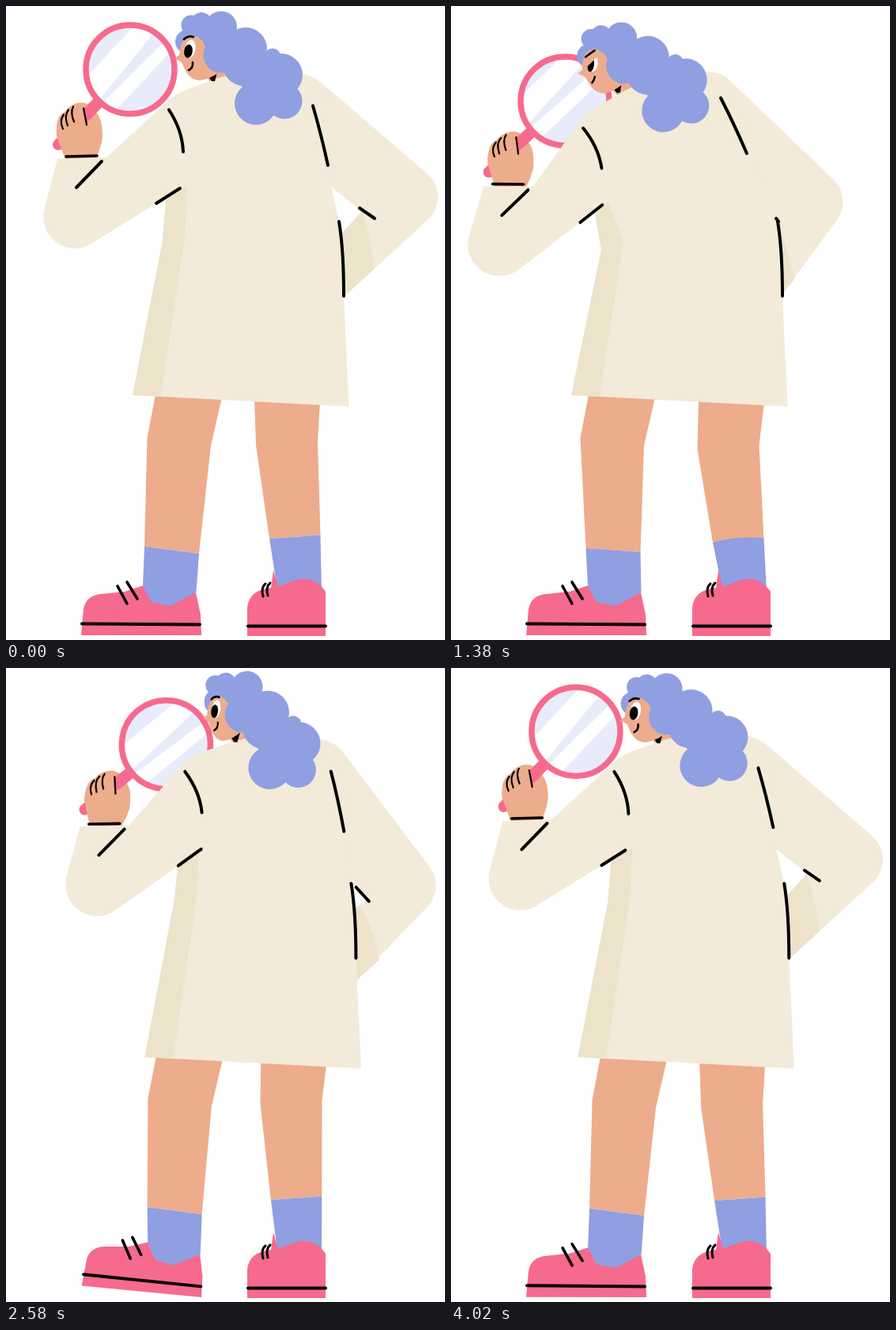
Recreate the animation shown at these times as an HTML page with a canvas. Size 555x800 px, loop 4.05 s.

```html
<!DOCTYPE html>
<html lang="en">
<head>
<meta charset="utf-8">
<title>Looking closer</title>
<style>
  html, body { margin: 0; width: 100%; height: 100%; overflow: hidden; background: #fff; }
  canvas { display: block; width: 555px; height: 800px; }
</style>
</head>
<body>
<canvas id="stage" width="555" height="800"></canvas>
<script>
const ctx = document.getElementById('stage').getContext('2d');
const LOOP = 4050, STEP = 30;
const COAT = '#f3ead9', SHADE = '#ede3cb', SKIN = '#edac8c', HAIR = '#909fe1';
const PINK = '#f66a8d', GLASS = '#e8ecfa', INK = '#000';

// --- Timing: three drivers from 0 to 1 move everything.
const span = (t, a, b) => Math.min(1, Math.max(0, (t - a) / (b - a)));
const glide = u => u + u * u - u * u * u;
const sway = u => (1 - Math.cos(Math.PI * u)) / 2;
function drivers(t) {
  const swing = sway(span(t, 1380, 2160));
  return {
    lean: glide(span(t, 0, 1260)) * (1 - swing),
    back: swing * glide(1 - span(t, 2160, LOOP)),
    lift: sway(span(t, 2520, 2940)) * (1 - sway(span(t, 3540, LOOP)))
  };
}

// --- Pose: home positions plus the reach of each driver.
function poseAt(t) {
  const { lean, back, lift } = drivers(t);
  const mix = (l, b, r) => l * lean + b * back + r * lift;
  const at = (x, y, l, b, r) => [x + mix(l[0], b[0], r[0]), y + mix(l[1], b[1], r[1])];
  const rig = (x, y, l, b, r, turn) => ({ home: [x, y], at: at(x, y, l, b, r), turn });
  const hemX = 160 + mix(-8, 17, -2);
  return {
    lean, back, lift,
    hem: (dx, y) => [hemX + dx, y],
    head:    rig(271, 24, [-57, 14], [36, -3], [3, 0], mix(-5.5, 9.5, 2)),
    chest:   rig(388, 126, [-47, -10], [25, 5], [0, 0], mix(-11, 2, 1)),
    arm:     rig(206, 131, [-39, 23], [22, 0], [4, -6], mix(-6, -4.5, 8.5)),
    forearm: rig(87, 266, [-26, 35], [31.5, 9], [-15.5, -23], mix(2, 0, 12)),
    lens:    rig(157, 80, [-13, 40], [49, 19], [13.5, -13], mix(3.3, 8.2, 5.2)),
    shoe:    rig(247, 794, [0, 0], [0, 0], [0, 0], 6 * back),
    joint:   at(507, 241, [-50.5, 6], [-3, 37], [3, -4]),
    gap:     at(450, 259, [-38, 11], [6, 36], [2, -4]),
    fold:    at(466, 331, [-32, 14], [6, 41], [2, -4]),
    crease:  at(447, 255, [-36, 13], [-5, 24], [3, -3])
  };
}

// --- Geometry helpers.
const rad = deg => deg * Math.PI / 180;
const shift = ([x, y], dx, dy) => [x + dx, y + dy];
const between = (a, b, f) => [a[0] + (b[0] - a[0]) * f, a[1] + (b[1] - a[1]) * f];
function carry({ home, at, turn }, x, y) {
  const dx = x - home[0], dy = y - home[1], c = Math.cos(rad(turn)), s = Math.sin(rad(turn));
  return [at[0] + dx * c - dy * s, at[1] + dx * s + dy * c];
}
function within({ home, at, turn }, draw) {
  ctx.save();
  ctx.translate(...at);
  ctx.rotate(rad(turn));
  ctx.translate(-home[0], -home[1]);
  draw();
  ctx.restore();
}

// --- Drawing helpers.
function fill(color, d) {
  ctx.fillStyle = color;
  ctx.fill(new Path2D(d));
}
function line(d, width = 4, color = INK) {
  ctx.strokeStyle = color;
  ctx.lineWidth = width;
  ctx.stroke(new Path2D(d));
}
const poly = (color, ...pts) => fill(color, 'M' + pts.join('L') + 'Z');
const join = (a, b, width) => line(`M${a}L${b}`, width);
const curve = (a, c, b) => line(`M${a}Q${c} ${b}`);
function oval(color, x, y, rx, ry = rx, tilt = 0) {
  ctx.fillStyle = color;
  ctx.beginPath();
  ctx.ellipse(x, y, rx, ry, rad(tilt), 0, 7);
  ctx.fill();
}
// Limb with a round joint; a and b are the ends of its outer edge.
function limb(a, c, r, b, side, ...rest) {
  const tangent = (q, s) => {
    const dx = q[0] - c[0], dy = q[1] - c[1];
    return Math.atan2(dy, dx) + s * Math.acos(r / Math.hypot(dx, dy));
  };
  ctx.fillStyle = COAT;
  ctx.beginPath();
  ctx.moveTo(...a);
  ctx.arc(...c, r, tangent(a, side), tangent(b, -side), side < 0);
  [b, ...rest].forEach(q => ctx.lineTo(...q));
  ctx.fill();
}

function drawLeg(hip, knee, ankle, thigh, calf, cuff) {
  poly(SKIN, hip, shift(hip, ...thigh), shift(knee, ...calf), shift(ankle, ...cuff), ankle, knee);
}

function drawLegs({ lean, back, shoe }) {
  const hipL = [189 - 15 * lean + back, 490];
  const ankleL = [175 - 4.5 * lean + 4 * back, 682 + 2 * lean - 2 * back];
  const cuffL = [69, 9 - 4 * lean];
  drawLeg(hipL, shift(hipL, -10.5, 55 - 2 * back), ankleL, [84, 4], [80.5, 9.5], cuffL);

  const ankleR = [333 - 2 * lean + 2 * back, 672 + 5 * lean - back];
  const cuffR = [64.5, -4.5 - lean];
  drawLeg([314 - lean + 9 * back, 496], [316 - 4.5 * lean + 6 * back, 554 + 5 * lean - 5 * back],
    ankleR, [83, 4], [78, -4], cuffR);

  within(shoe, () => {
    fill(PINK, 'M95 794L98 761Q101 744 120 742L150 739L174 731L210 745L240 740L246 768L247 794Z');
    line('M96 779.5L245 780.5');
    line('M141 732L153 754M153 727L166 748', 3.6);
  });
  poly(HAIR, ankleL, shift(ankleL, ...cuffL), carry(shoe, 240.5, 740),
    carry(shoe, 208, 757), carry(shoe, 184, 752.5), carry(shoe, 173, 732));

  fill(HAIR, `M${ankleR}Q${shift(ankleR, 32, -2 - 7 * lean)} ${shift(ankleR, ...cuffR)}`
    + 'L399 740L343 736Z');
  fill(PINK, 'M305 795V759Q307 737 335 734L338 712L344 733Q358 727 368 724Q390 719 404 739V795Z');
  line('M306 782.5H404');
  line('M325 745Q322 734 328 729M331 744Q328 733 334 728', 3);
}

function drawLens({ lens, lean }) {
  const thumb = 'M75 193L64 164C63 148 66 137 74 134C79 126 88 122 96 122';
  const heel = '122 163C121 175 118 181 114 192Z';
  within(lens, () => {
    fill(SKIN, `${thumb}C104 122 108 128 113 134C120 139 122 152 ${heel}`);
    line('M118 120L103 136', 15, PINK);
    line('M110 128L66 175', 14, PINK);
    fill(SKIN, `${thumb}L98 129L102 150L${heel}`);
    line('M72 155Q67 145 73 137M78 151Q73 138 79 131M86 146Q81 134 85 127M102 150L98 129', 2.2);

    ctx.save();
    ctx.beginPath();
    ctx.arc(157, 80, 55, 0, 7);
    ctx.clip();
    oval('#fff', 157, 80, 56);
    ctx.translate(157, 80);
    ctx.rotate(rad(-47));
    ctx.translate(0, -9 * lean);
    fill(GLASS, 'M-60 -60H60V-34H-60ZM-60 -2L60 -10V8L-60 3ZM-60 22H60V80H-60Z');
    ctx.restore();
    line('M101 80A56 56 0 1 1 213 80A56 56 0 1 1 101 80Z', 7.5, PINK);
  });
}

function drawCoat(p) {
  const { hem, lean, back, lift, gap, fold } = p;
  const chest = (x, y) => carry(p.chest, x, y + 3.5 * lean);
  const arm = (x, y) => carry(p.arm, x, y);
  const cuff = (x, y) => carry(p.forearm, x, y);
  const shoulder = arm(207, 118);
  const waist = 296 + 12 * lean - 8 * back;
  const pit = hem(42 - 12 * lean, 245 + 17 * lean - 10 * lift);
  const edge = hem(69 - 22 * lean, 226 + 20 * lean + 5 * back - 6 * lift);
  const side = hem(251 + 9 * (lean + back), 228 + 40 * lean + 45 * back - 6 * lift);
  const pocket = hem(264, 287 - 15 * lean + 20 * back);
  const wrist = hem(268, 366 - 4 * lean + 31 * back - 4 * lift);

  // Arm on the hip
  limb(chest(400, 98), p.joint, 39, wrist, 1, hem(240, 340), hem(220, 240));
  fill(SHADE, `M${between(gap, pocket, .6 * back)}Q${shift(between(gap, fold, .5), 3, 0)} `
    + `${fold}L${wrist}L${pocket}Z`);
  poly('#fff', side, gap, pocket, hem(261, 280));

  // Arm with the glass
  limb(p.forearm.at && cuff(65, 193), p.forearm.at, 39.8, arm(190, 249), -1,
    edge, shoulder, cuff(127, 191));

  fill(COAT, `M${hem(0, 491)}L${hem(38, waist)}L${pit}L${edge}L${shoulder}`
    + `Q${chest(217, 109)} ${chest(235, 103)}L${chest(268, 91)}L${chest(290, 85)}`
    + `L${chest(370, 85)}Q${chest(388, 87)} ${chest(400, 98)}`
    + `L${side}L${hem(261, 272)}L${hem(267, 366)}L${hem(273.5, 505.5)}Z`);
  poly(SHADE, hem(0, 491), hem(38, waist), pit, edge, hem(66, waist / 2 + 143), hem(36, 493));

  join(cuff(76, 190), cuff(115, 189), 3.6);
  join(cuff(121, 196), cuff(89, 229));
  curve(arm(206, 131), arm(223, 157), arm(224, 184));
  join(arm(190, 249), arm(220, 230));
  curve(...[[388, 126], [398, 160], [407, 201]].map(q => carry(p.chest, ...q)));
  join(p.crease, shift(p.crease, 19 - 16 * lean - 3 * back, 13 - 9 * lean + 5 * back));
  curve(hem(261, 272), hem(267, 308), hem(267, 366));
}

// The face turns a little on its own inside the head.
function withinFace({ head, back }, draw) {
  const at = shift([234, 23], -2 * back, 7 * back);
  within(head, () => within({ home: [234, 23], at, turn: -7.5 * back }, draw));
}

function drawNeck(p) {
  withinFace(p, () => fill(SKIN, 'M248 84L280 70L288 90L262 100Z'));
}

function drawHead(p) {
  const q = p.lean;
  withinFace(p, () => {
    fill(INK, 'M256 89L267 83L264 95L260 95Z');
    [[234, 24, 12.5], [247, 21, 13], [247, 34, 13]].forEach(c => oval(HAIR, ...c));

    // Turning away narrows the profile.
    ctx.translate(250, 0);
    ctx.scale(1 - .2 * p.back, 1);
    ctx.translate(-250, 0);
    oval(HAIR, 229, 45, 15);
    fill(SKIN, 'M226 41Q236 33 246 42L268 60L269 84Q258 92 245 94Q233 93 227 82'
      + 'L222 71L213 66L219 62Q220 48 226 41Z');
    ctx.save();
    ctx.clip(new Path2D(`M218 ${40 + 24 * q}L245 ${38 + 5 * q}V76H218Z`));
    oval('#fff', 233, 54, 6.5, 11.5, 8);
    oval(INK, 230.5, 57, 5.3 - 1.3 * q, 8.5, 8 + 8 * q);
    ctx.restore();
    line(`M225 ${42 + 4 * q}Q${230 + q} ${37 + 5 * q} 237 39`, 2.6);
    line(`M${236 - 2 * q} ${71 + q}Q${237 - 4 * q} ${78 - 2 * q} ${231 - q} ${81 - 2 * q}`, 2.6);
  });
  within(p.head, () => [
    [316, 123, 27], [352, 120, 22.5], [348, 87, 27], [337, 64, 10.5], [322, 92, 26],
    [272, 26.5, 20], [263, 42, 14], [303, 54, 27], [272, 62, 22.5], [301, 74, 27], [318, 78, 24]
  ].forEach(c => oval(HAIR, ...c)));
}

function frame(now) {
  const p = poseAt(Math.floor((now % LOOP) / STEP) * STEP);
  ctx.fillStyle = '#fff';
  ctx.fillRect(0, 0, 555, 800);
  ctx.lineCap = ctx.lineJoin = 'round';
  [drawLegs, drawLens, drawNeck, drawCoat, drawHead].forEach(draw => draw(p));
}

const start = performance.now();
function tick() {
  frame(performance.now() - start);
  requestAnimationFrame(tick);
}
tick();
</script>
</body>
</html>
```
